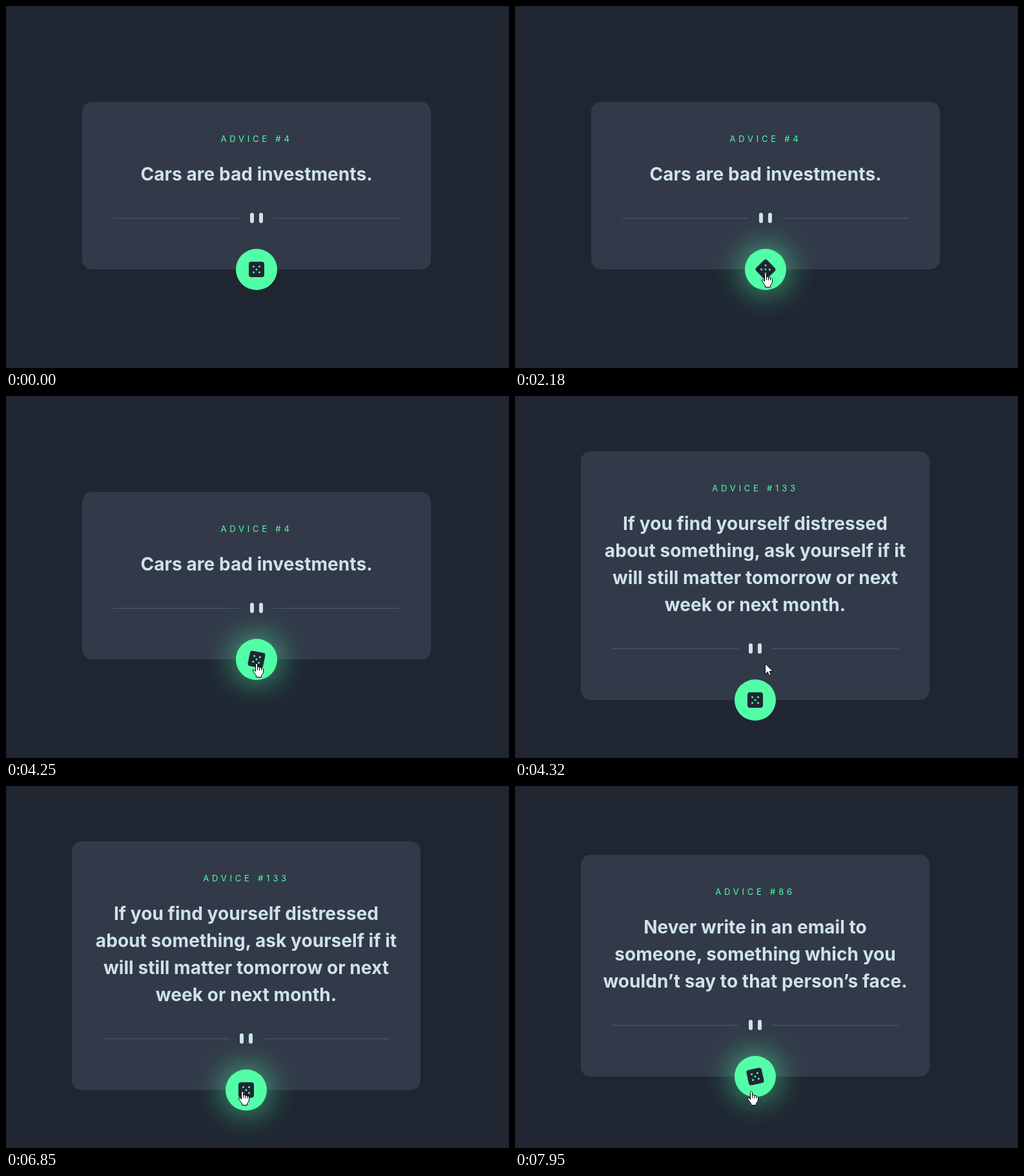
Recreate the animation shown at these times as an HTML page with a canvas. Size 779 by 562 pixels, loop 8 s.

```html
<!DOCTYPE html>
<html lang="en">
<head>
<meta charset="utf-8">
<title>Advice generator</title>
<style>
  html, body { margin: 0; width: 100%; height: 100%; overflow: hidden; background: #1f2632; }
  canvas, svg { position: absolute; left: 0; top: 0; width: 779px; height: 562px; }
  text { font-family: Inter, Roboto, sans-serif; font-optical-sizing: none; text-anchor: middle; }
  #label { font-size: 13px; font-weight: 400; letter-spacing: 4.8px; fill: #52ffa8; }
  .line { font-size: 28px; font-weight: 700; letter-spacing: 0.06px; fill: #cee3e9; }
</style>
</head>
<body>
<canvas id="stage" width="779" height="562"></canvas>
<svg viewBox="0 0 779 562"><text id="label"></text><g id="quote"></g></svg>
<script>
const ctx = document.getElementById('stage').getContext('2d');
const label = document.getElementById('label');
const quote = document.getElementById('quote');

const LOOP = 8000;
const TICK = 69.35;
const SPIN = 0.07;    // degrees per ms while hovered
const DARK = '#1f2632', CARD = '#323a49', GREEN = '#52ffa8', PALE = '#cee3e9', RULE = '#4f5d74';
const GLOW = 'rgba(82, 255, 168, 0.75)';

const cards = [
  { from: 0, cx: 388, top: 149, bottom: 409, id: 4, lines: ['Cars are bad investments.'] },
  { from: 4320, cx: 372, top: 86, bottom: 472, id: 133, lines: [
    'If you find yourself distressed',
    'about something, ask yourself if it',
    'will still matter tomorrow or next',
    'week or next month.'] },
  { from: 7880, cx: 372, top: 107, bottom: 451, id: 86, lines: [
    'Never write in an email to',
    'someone, something which you',
    'wouldn’t say to that person’s face.'] }
];
const hovers = [[1510, 4320], [5550, LOOP]];

const clamp = v => Math.min(1, Math.max(0, v));
const mix = (a, b, u) => a + (b - a) * u;
const between = (a, b, u) => [mix(a[0], b[0], u), mix(a[1], b[1], u)];
const easeOut = (u, p) => 1 - Math.pow(1 - u, p);

function step(t) {
  const base = t < 4320 ? 850 : 5240;
  return t < base ? t : base + Math.floor((t - base) / TICK) * TICK;
}

function pointer(t) {
  const rest = [387, 415], over = [367, 449];
  if (t < 5170) return between([662, 540], rest, easeOut(clamp((t - 850) / 770), 1.66));
  if (t < 5586) return between(rest, over, clamp((t - 5170) / 416));
  return between(over, [365, 474], easeOut(clamp((t - 5586) / 360), 1.5));
}

function box(x, y, w, h, r, color) {
  ctx.fillStyle = color;
  ctx.beginPath();
  ctx.roundRect(x, y, w, h, r);
  ctx.fill();
}

function disc(x, y, r, color) {
  ctx.fillStyle = color;
  ctx.beginPath();
  ctx.arc(x, y, r, 0, Math.PI * 2);
  ctx.fill();
}

function drawCard({ cx, top, bottom }) {
  box(cx - 270, top, 540, bottom - top, 15, CARD);
  const y = bottom - 80;
  ctx.fillStyle = RULE;
  ctx.fillRect(cx - 222, y, 196, 1);
  ctx.fillRect(cx + 26, y, 196, 1);
  box(cx - 10, y - 8, 6, 16, 3, PALE);
  box(cx + 4, y - 8, 6, 16, 3, PALE);
}

function drawButton(x, y, hover, angle) {
  ctx.save();
  ctx.translate(x, y);
  if (hover) {
    ctx.shadowColor = GLOW;
    ctx.shadowBlur = 50;
  }
  disc(0, 0, 32, GREEN);
  ctx.shadowColor = 'transparent';
  ctx.rotate(angle * Math.PI / 180);
  box(-12, -12, 24, 24, 4, DARK);
  for (const [dx, dy] of [[-1, -1], [1, -1], [0, 0], [-1, 1], [1, 1]]) {
    disc(dx * 4.5, dy * 4.5, 1.5, GREEN);
  }
  ctx.restore();
}

const arrow = new Path2D('M.5.5V17L4.3 13.4 6.8 19 9.4 17.9 7 12.4H12.2Z');
const hand = new Path2D('M-.5 1.5L.5.5H1.5L2.5 1.5V5.5H5L5.5 6.5H8L8.5 7.5H10L11.5 9V14' +
  'L10 17 8.5 18.5V21.5H.5V19L-1 17-2.5 14.5-4.5 12V10.5L-3 10-2 10.5-.5 12.5Z');
const fingers = new Path2D('M2.5 5.5V10.5M5.5 6.5V11M8.5 7.5V11');

function drawPointer([x, y], hover) {
  ctx.save();
  ctx.translate(Math.round(x), Math.round(y));
  ctx.fillStyle = '#fff';
  ctx.strokeStyle = '#000';
  ctx.lineWidth = 1;
  ctx.lineJoin = 'round';
  const shape = hover ? hand : arrow;
  ctx.fill(shape);
  ctx.stroke(shape);
  if (hover) ctx.stroke(fingers);
  ctx.restore();
}

function place(el, x, y, words) {
  el.setAttribute('x', x);
  el.setAttribute('y', y);
  el.textContent = words;
}

let shown = null;
function setText(card) {
  if (card === shown) return;
  shown = card;
  place(label, card.cx, card.top + 62, 'ADVICE #' + card.id);
  quote.replaceChildren(...card.lines.map((words, i) => {
    const el = document.createElementNS(quote.namespaceURI, 'text');
    el.setAttribute('class', 'line');
    place(el, card.cx, card.top + 122 + i * 42, words);
    return el;
  }));
}

function draw(time) {
  const t = time % LOOP;
  const card = cards.findLast(c => t >= c.from);
  const now = step(t);
  const hover = hovers.find(([start, end]) => now >= start && t < end);

  ctx.fillStyle = DARK;
  ctx.fillRect(0, 0, 779, 562);
  drawCard(card);
  drawButton(card.cx, card.bottom, hover, hover ? (now - hover[0]) * SPIN : 0);
  if (t >= 850) drawPointer(pointer(now), hover);
  setText(card);
}

let began = null;
function loop(time) {
  began ??= time;
  draw(time - began);
  requestAnimationFrame(loop);
}
draw(0);
requestAnimationFrame(loop);
</script>
</body>
</html>
```
